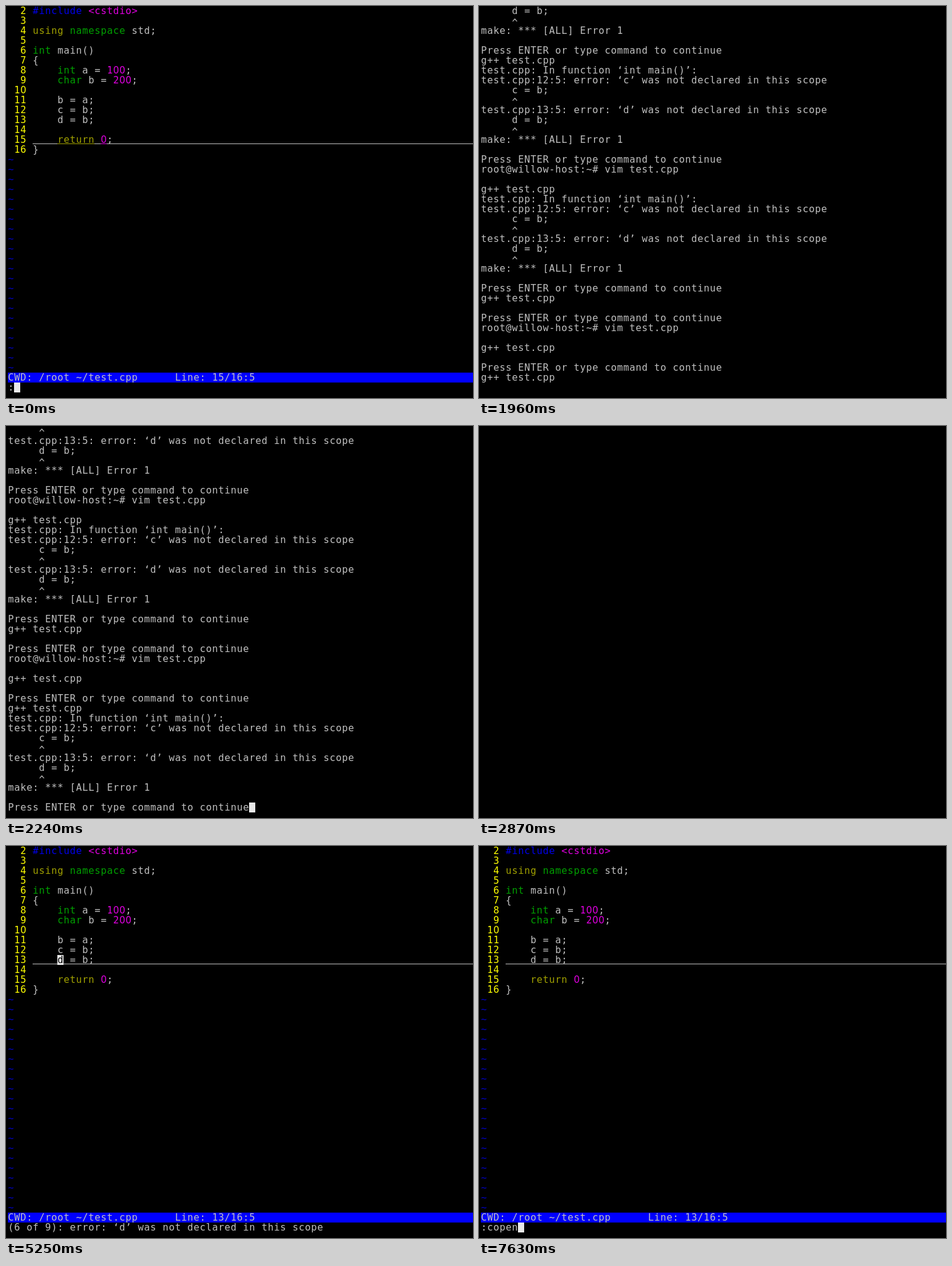
Write an HTML page with a canvas that moves like this. It is 755 px wide and 633 px high and loops after 8 s.

```html
<!DOCTYPE html>
<html lang="en">
<head>
<meta charset="utf-8">
<title>Terminal</title>
<style>
  html, body { margin: 0; width: 100%; height: 100%; overflow: hidden; background: #000; }
  canvas { display: block; }
</style>
</head>
<body>
<canvas id="screen" width="755" height="633"></canvas>
<script>
const ctx = document.getElementById('screen').getContext('2d');
const LOOP = 8000, LEFT = 3, CELL = 10, ROW = 16, ROWS = 39;
const MONO = '15.5px "DejaVu Sans Mono", monospace';
const SANS = '15px "DejaVu Sans", sans-serif'; // plain zero without a dot

const color = {
  fg: '#c0c0c0', number: '#ffff00', type: '#00a000', keyword: '#a0a000',
  pre: '#0000e8', value: '#e000e0', tilde: '#0000c0', bar: '#0000ff', cursor: '#e8e8e8'
};

// Source lines 2 to 16; a mark before a word in braces sets its colour.
const marks = { p: 'pre', k: 'keyword', t: 'type', v: 'value' };
const code = [
  'p{#include} v{<cstdio>}', '', 'k{using} t{namespace} std;', '', 't{int} main()', '{',
  '    t{int} a = v{100};', '    t{char} b = v{200};', '', '    b = a;', '    c = b;',
  '    d = b;', '', '    k{return} v{0};', '}'
];

const compile = 'g++ test.cpp';
const press = ['', 'Press ENTER or type command to continue'];
const shell = 'root@willow-host:~# vim test.cpp';
const undeclared = name => `error: ‘${name}’ was not declared in this scope`;
const report = (line, name) => [
  `test.cpp:${line}:5: ${undeclared(name)}`, `     ${name} = b;`, '     ^'
];
const failure = [
  'test.cpp: In function ‘int main()’:', ...report(12, 'c'), ...report(13, 'd'),
  'make: *** [ALL] Error 1'
];
const log = [
  ...failure.slice(-3), ...press, compile, ...failure, ...press,
  shell, '', compile, ...failure, ...press, compile, ...press,
  shell, '', compile, ...press, compile
];

function glyph(ch, col, row, fill) {
  if (ch === ' ') return;
  ctx.font = ch === '0' ? SANS : MONO;
  ctx.fillStyle = fill;
  ctx.fillText(ch, LEFT + col * CELL + CELL / 2, row * ROW + 13 + (ch === '^' ? 3 : 0));
}

function write(text, col, row, fill = color.fg) {
  [...text].forEach((ch, i) => glyph(ch, col + i, row, fill));
}

function block(col, row, under = ' ') {
  ctx.fillStyle = color.cursor;
  ctx.fillRect(LEFT + col * CELL, row * ROW, CELL, ROW);
  glyph(under, col, row, '#000');
}

function codeLine(text, row, underlined) {
  const rule = (col, count, fill) => {
    ctx.fillStyle = fill;
    ctx.fillRect(LEFT + col * CELL, row * ROW + 14, count * CELL, 1);
  };
  if (underlined) rule(4, 72, color.fg);
  let col = 4;
  for (const [part, mark, word] of text.matchAll(/([pktv])\{(.+?)\}|[^]/g)) {
    const shown = word || part, fill = color[marks[mark]] || color.fg;
    write(shown, col, row, fill);
    if (underlined && mark) rule(col, shown.length, fill);
    col += shown.length;
  }
}

function editor(line, message) {
  code.forEach((text, row) => {
    write(String(row + 2).padStart(3), 0, row, color.number);
    codeLine(text, row, row + 2 === line);
  });
  for (let row = code.length; row < 37; row++) write('~', 0, row, color.tilde);
  ctx.fillStyle = color.bar;
  ctx.fillRect(LEFT, 37 * ROW, 752, ROW);
  write(`CWD: /root ~/test.cpp      Line: ${line}/16:5`, 0, 37);
  write(message, 0, 38);
}

const command = (line, text, on = true) => () => {
  editor(line, text);
  if (on) block(text.length, 38);
};

const visit = (line, on = true, shownError = line) => () => {
  const message = shownError === 12 ? `(3 of 9): ${undeclared('c')}` : `(6 of 9): ${undeclared('d')}`;
  editor(line, message);
  if (on) block(8, line - 2, line === 12 ? 'c' : 'd');
};

// Shows the tail of the log; an unfinished run leaves the last row empty.
const output = (count, done = false, on = false) => () => {
  const lines = [...log, ...failure.slice(0, count), ...(done ? press : [''])];
  lines.slice(-ROWS).forEach((text, row) => write(text, 0, row));
  if (on) block(press[1].length, 38);
};

const steps = [
  [0, command(15, ':')],
  [350, command(15, ':m')],
  [420, command(15, ':ma')],
  [560, command(15, ':ma', false)],
  [840, command(15, ':make')],
  [1540, command(15, ':make', false)],
  [1960, output(0)],
  [2030, output(1)],
  [2100, output(7)],
  [2170, output(8)],
  [2240, output(8, true, true)],
  [2520, output(8, true)],
  [2870, () => {}],
  [2940, visit(12)],
  [3430, visit(12, false)],
  [3920, visit(12)],
  [4410, visit(12, false)],
  [4900, visit(12)],
  [5180, visit(13, true, 12)],
  [5250, visit(13)],
  [5320, visit(12)],
  [5810, visit(13, true, 12)],
  [5880, visit(13)],
  [6300, visit(13, false)],
  [6790, visit(13)],
  [7280, visit(13, false)],
  [7420, command(13, ':cop')],
  [7560, command(13, ':cope')],
  [7630, command(13, ':copen')]
];

ctx.textAlign = 'center';
let start, current;

function tick(now) {
  start ??= now;
  const time = (now - start) % LOOP;
  const step = steps.findLast(([from]) => from <= time);
  if (step !== current) {
    current = step;
    ctx.fillStyle = '#000';
    ctx.fillRect(0, 0, 755, 633);
    step[1]();
  }
  requestAnimationFrame(tick);
}
requestAnimationFrame(tick);
</script>
</body>
</html>
```
